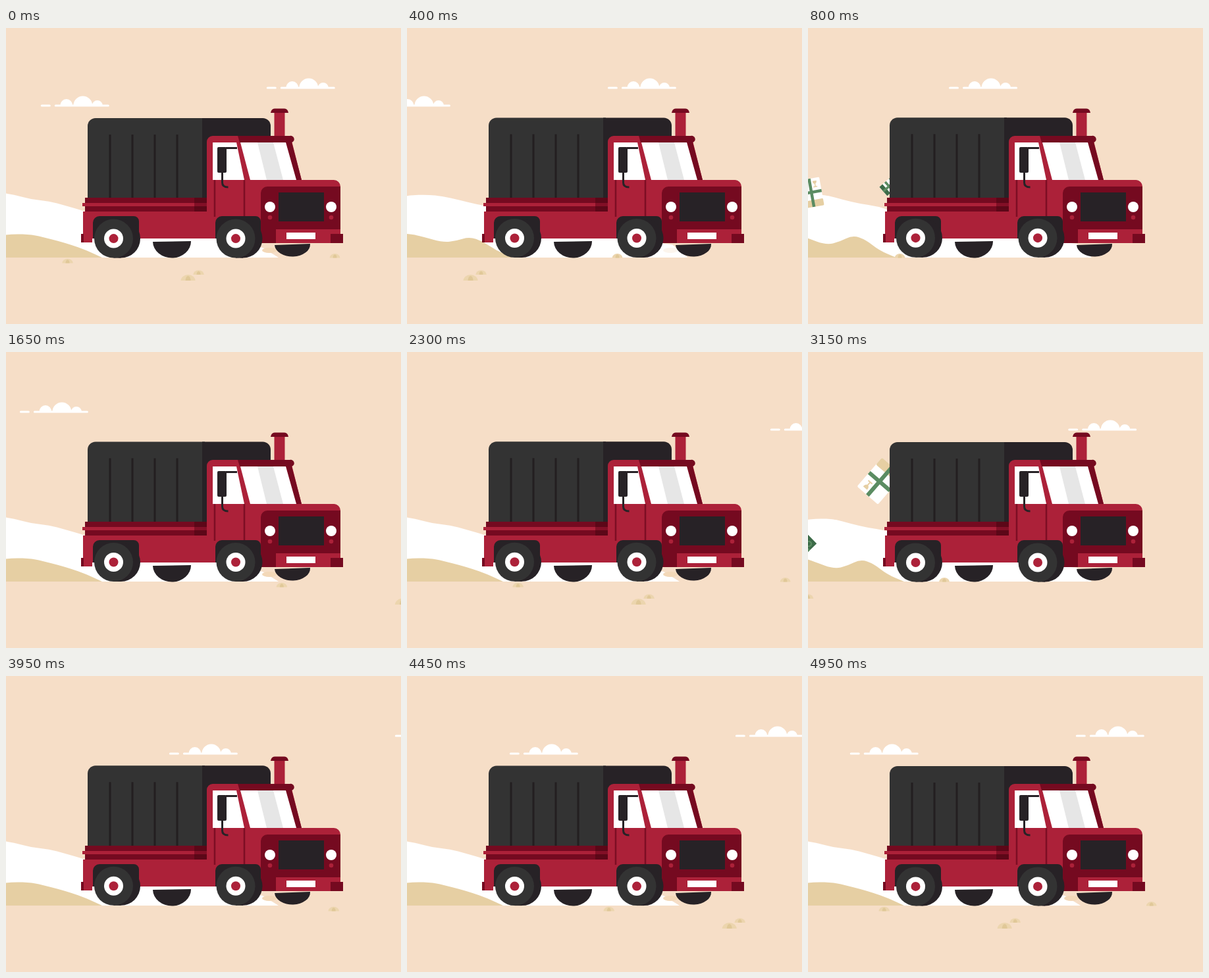
Recreate the animation shown at these times as an HTML page. Size 600 by 450 pixels, loop 5000 ms.

```html
<!DOCTYPE html>
<html lang="en">
<head>
<meta charset="utf-8">
<title>Truck</title>
<style>
  html, body { margin: 0; width: 100%; height: 100%; overflow: hidden; background: #f6dec7; }
  svg { display: block; width: 100vw; height: 100vh; }
  .white { fill: #fff; }
  .red { fill: #ac2139; }
  .wine { fill: #750a20; }
  .deep { fill: #5c0718; }
  .black { fill: #272226; }
  .grey { fill: #333; }
  .sand { fill: #e6cfa3; }
  .green { fill: #5b8c62; }
  .pine { fill: #3c6b48; }
</style>
</head>
<body>
<svg viewBox="0 0 600 450">
  <defs>
    <g id="cloud" class="white">
      <rect y="-1.5" width="15" height="3" rx="1.5"/>
      <rect x="21" y="-1.5" width="83" height="3" rx="1.5"/>
      <path d="M29.500 0a9.500 10 0 0 1 19 0zM49.500 0a14.500 14.500 0 0 1 29 0zM78 0a8 8 0 0 1 16 0z"/>
    </g>
    <g id="puff">
      <path d="M-11 0a11 9 0 0 1 22 0z" fill="#ecd5ae"/>
      <path d="M-4 0a4 7 0 0 1 8 0z" fill="#e0c898"/>
    </g>
    <g id="wheel">
      <circle class="black" cx="11" r="29.500"/>
      <path class="black" d="M0-29.500h11v59H0z"/>
      <circle class="grey" r="29.500"/>
      <circle class="white" r="14.500"/>
      <circle class="red" r="7"/>
    </g>
  </defs>

  <rect width="600" height="450" fill="#f6dec7"/>
  <use href="#cloud" id="high"/>
  <use href="#cloud" id="low"/>
  <path id="smoke" class="white"/>
  <path id="dust" class="sand"/>
  <ellipse id="clod" cx="400" cy="338" rx="11" ry="4" fill="#f3d8b8"/>
  <g id="puffs"></g>

  <g class="gift">
    <rect class="pine" x="-18" y="-18" width="36" height="36"/>
    <path class="green" d="M-18-4h36v8h-36z"/>
    <circle class="green" cx="10" cy="-9" r="5"/>
    <circle class="pine" cx="10" cy="-9" r="2.500"/>
  </g>
  <g class="gift">
    <rect class="white" x="-29" y="-21" width="58" height="42" rx="2"/>
    <rect class="sand" x="15" y="-21" width="14" height="42" rx="2"/>
    <path class="green" d="M-29-3h58v6h-58zM-4-21h6v42h-6z"/>
    <path class="sand" d="M-23-14v8q5 0 6-3h5v3h2v-8h-2v3h-5q-1-3-6-3z"/>
  </g>
  <g class="gift">
    <rect class="white" x="-13" y="-10" width="26" height="20"/>
    <rect class="pine" x="-13" y="-10" width="7" height="20"/>
    <path class="green" d="M-13-2h26v4h-26zM-2-10h4v20h-4zM8-10h3v20h-3z"/>
  </g>

  <path class="black" d="M223 325l58-1a29 25 0 0 1-58 1z"/>
  <path class="black" d="M408 330l54-2a27 18.500 0 0 1-54 2z"/>

  <g id="canopy">
    <path class="grey" d="M124 262V149a12 12 0 0 1 12-12h166v125z"/>
    <path class="black" d="M298 262V137h92a12 12 0 0 1 12 12v113z"/>
    <path d="M158 162v98M192 162v98M226 162v98M260 162v98" stroke="#231f20" stroke-width="3"/>
  </g>
  <rect class="red" x="407.500" y="127" width="16" height="40"/>
  <path class="wine" d="M402 129q1-6.500 6-6.500h15q5 0 6 6.500z"/>

  <rect class="wine" x="120" y="258" width="186" height="21"/>
  <rect class="deep" x="286" y="258" width="20" height="21"/>
  <rect class="red" x="116" y="266" width="170" height="5"/>
  <rect x="286" y="266" width="20" height="5" fill="#820f26"/>
  <path class="red" d="M117 279h271v41H131v6h-14z"/>
  <rect class="wine" x="114" y="313" width="4" height="13"/>

  <path class="red" d="M305 320V173a9 9 0 0 1 9-9h118l17 67h49a10 10 0 0 1 10 10v72h-15v14h-109v-7z"/>
  <path class="wine" d="M352 164h79a5 5 0 0 1 3 10l15 57h-8l-16-57h-70z"/>
  <path class="white" d="M314 174h36l12 57h-48zM356 174h69l16 57h-70z"/>
  <path d="M382 174h24l15 57h-25z" fill="#e6e6e6"/>
  <path d="M317 231v56M362 231v56" stroke="#7d0e24" stroke-width="2.500"/>
  <path d="M334 182.500h17M328.500 218v17q0 7 9 7" fill="none" stroke="#272226" stroke-width="3"/>
  <rect class="black" x="321" y="181" width="14" height="39" rx="2"/>

  <path class="wine" d="M387 327v-76a10 10 0 0 1 10-10h111v65h-98v21z"/>
  <rect class="black" x="414" y="250" width="69" height="44"/>
  <path class="white" d="M426 311h44v10h-44z"/>
  <rect class="wine" x="493" y="313" width="19" height="14"/>
  <circle class="white" cx="401" cy="272" r="8"/>
  <circle class="white" cx="494" cy="272" r="8"/>
  <circle class="red" cx="401" cy="288" r="3.300"/>
  <circle class="red" cx="494" cy="288" r="3.300"/>
  <path class="black" d="M132 320v-24a10 10 0 0 1 10-10h52a8 8 0 0 1 8 8v26zM318 320v-24a10 10 0 0 1 10-10h51a8 8 0 0 1 8 8v26z"/>
  <g id="wheels">
    <use href="#wheel" x="163.500" y="320"/>
    <use href="#wheel" x="349" y="320"/>
  </g>
</svg>

<script>
const LOOP = 5000, CYCLE = LOOP / 2;
const $ = id => document.getElementById(id);
const mix = (a, b, k) => a + (b - a) * k;
const ease = k => { k = Math.min(1, Math.max(0, k)); return k * k * (3 - 2 * k); };
const place = (el, x, y, extra = '') => el.setAttribute('transform', `translate(${x} ${y}) ${extra}`);

// x, height at rest, height while gifts fall
const SMOKE = [[-40, 246, 262], [-10, 250, 256], [15, 254, 253], [40, 261, 254], [65, 263, 261],
  [90, 270, 267], [118, 278, 271], [145, 287, 280]];
const DUST = [[-40, 320, 308], [-10, 316, 312], [10, 313, 319], [40, 314, 330], [60, 319, 325],
  [80, 324, 315], [100, 330, 322], [120, 337, 338], [146, 349, 349]];

// x at cycle start, baseline, scale
const PUFFS = [[94, 357.500, .75], [277, 384, 1], [293, 375, .75], [500, 349.500, .72]];
// time, height offset, angle, spin per 150 ms, size
const GIFTS = [[475, 25, -60, 90, 1.4], [650, 0, -50, 129, 1], [820, 47, -30, 90, .9]];

const gifts = [...document.querySelectorAll('.gift')];
const puffs = PUFFS.flatMap(([x, y, size]) => [0, 1].map(incoming => {
  const el = document.createElementNS('http://www.w3.org/2000/svg', 'use');
  el.setAttribute('href', '#puff');
  $('puffs').append(el);
  return { el, x, y, size, incoming };
}));

// Smooth ridge through the midpoints of the given points
function ridge(rows, k, drift) {
  const pts = rows.map(([x, a, b]) => [x + drift, mix(a, b, k)]);
  let d = `M${pts[0][0]} 349L${pts[0]}`;
  for (let i = 1; i < pts.length - 1; i++) {
    const [x, y] = pts[i], [nx, ny] = pts[i + 1];
    d += `Q${x} ${y} ${(x + nx) / 2} ${(y + ny) / 2}`;
  }
  return d + `L${pts[pts.length - 1]}`;
}

function drawClouds(t) {
  place($('high'), t < 2500 ? 396 - t * .2272 : 591 - (t - 3950) * .184, 91);
  place($('low'), t < 1000 ? 53 - t * .2272 : 552 - (t - 2300) * .1842, 118);
}

function drawGround(p, second) {
  const k = ease(p / 600) * (1 - ease((p - 850) / 550));
  const drift = k * (650 - p) * .08;
  $('smoke').setAttribute('d', ridge(SMOKE, k, drift) +
    `L300 316L${mix(390, 408, k)} ${mix(334, 328, k)}L${mix(414, 431, k)} 349Z`);
  $('dust').setAttribute('d', ridge(DUST, k, drift) + 'Z');
  $('clod').setAttribute('opacity', 1 - k);
  const lag = second ? 3 : -2, rate = second ? .382 : .385;
  for (const { el, x, y, size, incoming } of puffs) {
    const px = incoming ? x + lag + (CYCLE - p) * rate : x - p * .45;
    place(el, px, y, `scale(${size})`);
  }
}

function drawGifts(p) {
  GIFTS.forEach(([at, dy, angle, spin, size], i) => {
    const s = (p - at) / 150;
    const scale = size * (1 - .25 * Math.max(0, s));
    gifts[i].style.display = s > -.7 && s < 2 ? '' : 'none';
    place(gifts[i], 110 - 104 * s, 196 + dy + 22 * s + 32 * s * s,
      `rotate(${angle + spin * s}) scale(${scale})`);
  });
}

function draw(now) {
  const t = now % LOOP, p = t % CYCLE;
  const bob = Math.cos(t / LOOP * 32 * Math.PI) / 2;
  drawClouds(t);
  drawGround(p, t >= CYCLE);
  drawGifts(p);
  place($('canopy'), 0, bob - .4);
  place($('wheels'), 0, bob - .4);
}

const start = performance.now();
function tick() {
  draw(performance.now() - start);
  requestAnimationFrame(tick);
}
tick();
</script>
</body>
</html>
```
